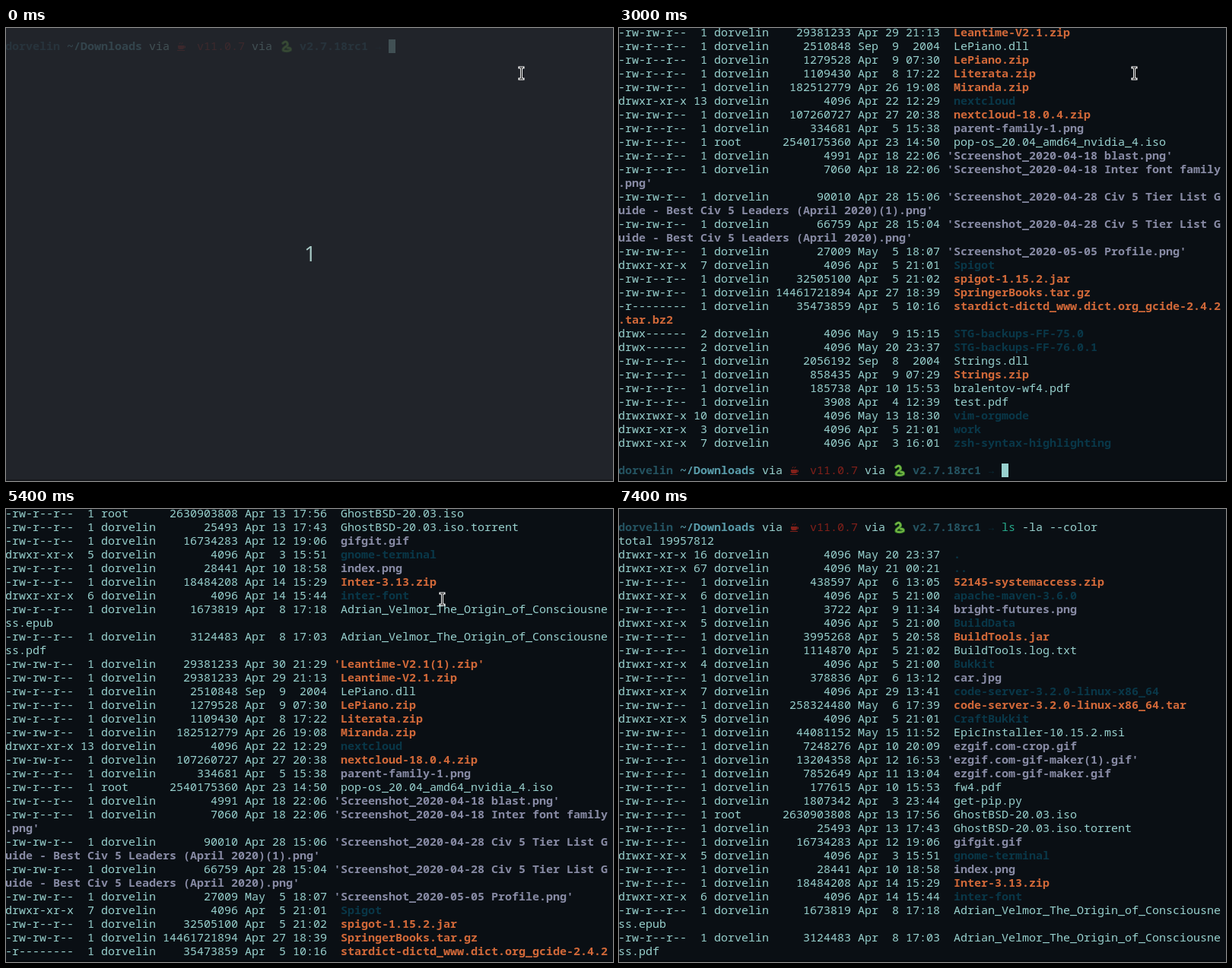
Write an HTML page with a canvas that moves like this. It is 798 by 596 pixels and loops after 7800 ms.

```html
<!DOCTYPE html>
<html lang="en">
<head>
<meta charset="utf-8">
<title>Terminal listing</title>
<style>
html, body { margin: 0; width: 798px; height: 596px; overflow: hidden; background: #0a0f14; }
canvas { display: block; }
</style>
</head>
<body>
<canvas id="stage" width="798" height="596"></canvas>
<script>
const ctx = document.getElementById('stage').getContext('2d');
const LOOP = 7800, CELL = 9, LINE = 18, LEFT = -1, TOP = -3, COLS = 88, ROWS = 33;
const FONT = '15px "Noto Sans Mono", "DejaVu Sans Mono", monospace';
const USER = 'dorvelin', COMMAND = 'ls -la --color';
const C = {
  back: '#0a0f14', text: '#98d1ce', dir: '#093748', archive: '#d26939', image: '#888ba5',
  user: '#245361', path: '#599caa', java: '#82201a', arrow: '#0a2833', command: '#26a98b'
};
const MODES = {
  D: 'drwxr-xr-x', P: 'drwx------', G: 'drwxrwxr-x',
  R: '-rw-r--r--', W: '-rw-rw-r--', O: '-r--------'
};

// mode, links, [root], size, month, day, time or year, name
const LISTING = `D 16 4096 May 20 23:37 .
D 67 4096 May 21 00:21 ..
R 1 438597 Apr 6 13:05 52145-systemaccess.zip
D 6 4096 Apr 5 21:00 apache-maven-3.6.0
R 1 3722 Apr 9 11:34 bright-futures.png
D 5 4096 Apr 5 21:00 BuildData
R 1 3995268 Apr 5 20:58 BuildTools.jar
R 1 1114870 Apr 5 21:02 BuildTools.log.txt
D 4 4096 Apr 5 21:00 Bukkit
R 1 378836 Apr 6 13:12 car.jpg
D 7 4096 Apr 29 13:41 code-server-3.2.0-linux-x86_64
W 1 258324480 May 6 17:39 code-server-3.2.0-linux-x86_64.tar
D 5 4096 Apr 5 21:01 CraftBukkit
W 1 44081152 May 15 11:52 EpicInstaller-10.15.2.msi
R 1 7248276 Apr 10 20:09 ezgif.com-crop.gif
R 1 13204358 Apr 12 16:53 'ezgif.com-gif-maker(1).gif'
R 1 7852649 Apr 11 13:04 ezgif.com-gif-maker.gif
R 1 177615 Apr 10 15:53 fw4.pdf
R 1 1807342 Apr 3 23:44 get-pip.py
R 1 root 2630903808 Apr 13 17:56 GhostBSD-20.03.iso
R 1 25493 Apr 13 17:43 GhostBSD-20.03.iso.torrent
R 1 16734283 Apr 12 19:06 gifgit.gif
D 5 4096 Apr 3 15:51 gnome-terminal
R 1 28441 Apr 10 18:58 index.png
R 1 18484208 Apr 14 15:29 Inter-3.13.zip
D 6 4096 Apr 14 15:44 inter-font
R 1 1673819 Apr 8 17:18 Adrian_Velmor_The_Origin_of_Consciousness.epub
R 1 3124483 Apr 8 17:03 Adrian_Velmor_The_Origin_of_Consciousness.pdf
W 1 29381233 Apr 30 21:29 'Leantime-V2.1(1).zip'
W 1 29381233 Apr 29 21:13 Leantime-V2.1.zip
R 1 2510848 Sep 9 2004 LePiano.dll
R 1 1279528 Apr 9 07:30 LePiano.zip
R 1 1109430 Apr 8 17:22 Literata.zip
W 1 182512779 Apr 26 19:08 Miranda.zip
D 13 4096 Apr 22 12:29 nextcloud
W 1 107260727 Apr 27 20:38 nextcloud-18.0.4.zip
R 1 334681 Apr 5 15:38 parent-family-1.png
R 1 root 2540175360 Apr 23 14:50 pop-os_20.04_amd64_nvidia_4.iso
R 1 4991 Apr 18 22:06 'Screenshot_2020-04-18 blast.png'
R 1 7060 Apr 18 22:06 'Screenshot_2020-04-18 Inter font family.png'
W 1 90010 Apr 28 15:06 'Screenshot_2020-04-28 Civ 5 Tier List Guide - Best Civ 5 Leaders (April 2020)(1).png'
W 1 66759 Apr 28 15:04 'Screenshot_2020-04-28 Civ 5 Tier List Guide - Best Civ 5 Leaders (April 2020).png'
W 1 27009 May 5 18:07 'Screenshot_2020-05-05 Profile.png'
D 7 4096 Apr 5 21:01 Spigot
R 1 32505100 Apr 5 21:02 spigot-1.15.2.jar
W 1 14461721894 Apr 27 18:39 SpringerBooks.tar.gz
O 1 35473859 Apr 5 10:16 stardict-dictd_www.dict.org_gcide-2.4.2.tar.bz2
P 2 4096 May 9 15:15 STG-backups-FF-75.0
P 2 4096 May 20 23:37 STG-backups-FF-76.0.1
R 1 2056192 Sep 8 2004 Strings.dll
R 1 858435 Apr 9 07:29 Strings.zip
R 1 185738 Apr 10 15:53 bralentov-wf4.pdf
R 1 3908 Apr 4 12:39 test.pdf
G 10 4096 May 13 18:30 vim-orgmode
D 3 4096 Apr 5 21:01 work
D 7 4096 Apr 3 16:01 zsh-syntax-highlighting`;

// A line is a list of spans: [column, text, colour, bold]
const PROMPT = [
  [0, USER, C.user, true], [9, '~/Downloads', C.path, true], [21, 'via', C.text],
  [28, 'v11.0.7', C.java], [36, 'via', C.text], [43, 'v2.7.18rc1', C.user, true],
  [54, '→', C.arrow, true]
];
PROMPT.icons = true;

function nameColour(mode, name) {
  if ('DPG'.includes(mode)) return C.dir;
  if (/\.(zip|jar|tar|gz|bz2)'?$/.test(name)) return C.archive;
  if (/\.(png|jpg|gif)'?$/.test(name)) return C.image;
  return C.text;
}

function entryLines(row) {
  const [, mode, links, root, size, month, day, time, name] =
    row.match(/^(\w) (\d+) (root )?(\d+) (\w+) (\d+) (\S+) (.+)$/);
  const info = [
    MODES[mode], links.padStart(2), (root ? 'root' : USER).padEnd(8),
    size.padStart(11), month, day.padStart(2), time.padStart(5)
  ].join(' ');
  const colour = nameColour(mode, name), bold = colour !== C.text;
  const col = name[0] === "'" ? 48 : 49, room = COLS - col;
  const lines = [[[0, info, C.text], [col, name.slice(0, room), colour, bold]]];
  if (name.length > room) lines.push([[0, name.slice(room), colour, bold]]);
  return lines;
}

const output = [[[0, 'total 19957812', C.text]], ...LISTING.split('\n').flatMap(entryLines), []];

const KEYS = [600, 700, 800, 1100, 1300, 1400, 1600, 1800, 2000, 2100, 2200, 2400, 2600, 2700];
const ENTER = 3000;
const SCROLL = [[0, 0], [ENTER, 34], [4900, 31], [5200, 28], [5400, 22], [5500, 19], [5600, 16],
  [5700, 13], [5900, 10], [6300, 7], [6500, 4], [6700, 1], [6800, 0]];
const MOUSE = [[0, 678, 60], [4500, 650, 76], [4600, 600, 108], [4700, 574, 119],
  [6000, 572, 128], [6100, 568, 142], [6200, 565, 153],
  [7000, 540, 128], [7100, 450, 84], [7200, 315, 40], [7300, 182, 9], [7400, -50, -50]];

const latest = (steps, t) => steps.filter(step => step[0] <= t).pop();

function stroke(path, colour, width) {
  ctx.strokeStyle = colour;
  ctx.lineWidth = width;
  ctx.stroke(new Path2D(path));
}

function drawIcons(y) {
  ctx.save();
  ctx.translate(0, y);
  ctx.lineCap = 'round';
  ctx.fillStyle = C.java;
  ctx.fill(new Path2D('M226 8h8v2q0 3-2 3h-4q-2 0-2-3z'));
  stroke('M225.5 14.5h9M234 9h1.5v2h-2M228 6l1-1.500M231 6l1-1.500', C.java, 1);
  const snake = 'M364 5q4-4 6 0q1 3-3 5q-5 4-1 5q5 1 8-1q1-3-4-3';
  stroke(snake, '#3f8f2f', 3.6);
  stroke(snake, '#86bd4a', 1.4);
  ctx.restore();
}

function drawLine(line, y) {
  for (const [col, text, colour, bold] of line) {
    ctx.font = (bold ? 'bold ' : '') + FONT;
    ctx.fillStyle = colour;
    ctx.fillText(text, LEFT + col * CELL, y + 14);
  }
  if (line.icons) drawIcons(y);
}

function drawMouse(x, y) {
  const beam = `M${x - 2.5} ${y - 7.5}h5M${x - 2.5} ${y + 7.5}h5M${x} ${y - 7}v14`;
  ctx.lineCap = 'square';
  stroke(beam, '#fff', 3);
  ctx.lineCap = 'butt';
  stroke(beam, '#000', 1);
}

function drawCountdown() {
  ctx.fillStyle = 'rgba(40, 43, 50, .775)';
  ctx.fillRect(0, 0, 798, 596);
  ctx.fillStyle = '#a9cbc7';
  ctx.font = '28px "Open Sans", "Noto Sans", sans-serif';
  ctx.textAlign = 'center';
  ctx.fillText('1', 400, 307);
  ctx.textAlign = 'left';
}

function draw(t) {
  const typed = KEYS.filter(key => key <= t).length;
  const command = Object.assign([...PROMPT,
    [56, COMMAND.slice(0, Math.min(typed, 2)), C.command],
    [58, COMMAND.slice(2, typed), C.text]], { icons: true });
  const done = t >= ENTER;
  const lines = [[], command, ...(done ? [...output, PROMPT] : [])];
  const first = latest(SCROLL, t)[1];

  ctx.fillStyle = C.back;
  ctx.fillRect(0, 0, 798, 596);
  lines.slice(first, first + ROWS).forEach((line, i) => drawLine(line, TOP + i * LINE));

  const caretRow = lines.length - 1 - first;
  if (caretRow < ROWS) {
    ctx.fillStyle = C.text;
    ctx.fillRect(LEFT + (56 + (done ? 0 : typed)) * CELL, TOP + caretRow * LINE, CELL, LINE);
  }
  if (t < 500) drawCountdown();
  ctx.fillStyle = 'rgba(0, 0, 0, .3)';
  ctx.fillRect(0, 594, 798, 2);
  const [, x, y] = latest(MOUSE, t);
  drawMouse(x - .5, y - .5);
}

function tick() {
  draw(performance.now() % LOOP);
  requestAnimationFrame(tick);
}
tick();
</script>
</body>
</html>
```
